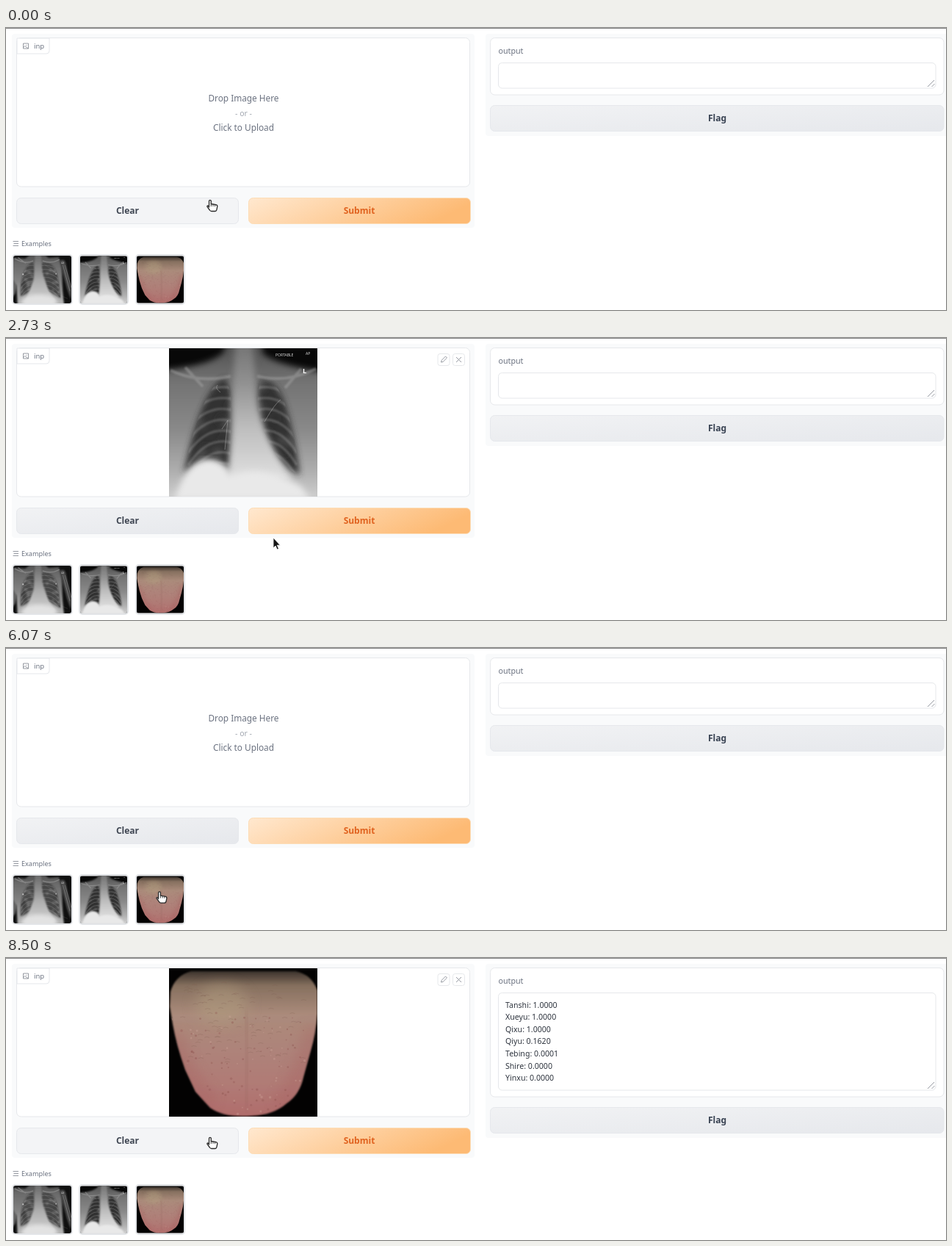
An HTML page for the animation above (8530 ms loop, 1280 px wide and 384 px high).

```html
<!DOCTYPE html>
<html lang="en">
<head>
<meta charset="utf-8">
<title>Image classifier demo</title>
<style>
html, body { margin: 0; width: 100%; height: 100%; overflow: hidden; background: #fff; }
svg { display: block; }
text { font-family: "Noto Sans", "Open Sans", sans-serif; }
.btn { font-size: 12px; font-weight: 600; text-anchor: middle; }
.drop { font-size: 11.8px; text-anchor: middle; fill: #6b7280; }
.card { fill: #fff; stroke: #e6e8eb; }
.line { fill: none; stroke: #8b8f98; stroke-width: .9; }
</style>
</head>
<body>
<svg id="stage" width="1280" height="384" viewBox="0 0 1280 384"></svg>
<script>
const LOOP = 8530, SPEED = 3, ROW = 16.65;

let seed = 11;
const rnd = () => (seed = (seed * 16807) % 2147483647) / 2147483647;
const span = (a, b) => (a + rnd() * (b - a)).toFixed(1);
const many = (n, f) => Array.from({ length: n }, (_, i) => f(i)).join('');
const rect = (x, y, w, h, r, extra = '') =>
  `<rect x="${x}" y="${y}" width="${w}" height="${h}" rx="${r}" ${extra}/>`;
const label = (x, y, s, extra = '') => `<text x="${x}" y="${y}" ${extra}>${s}</text>`;
const grad = (id, stops, dir = 'x2="0" y2="1"') =>
  `<linearGradient id="${id}" ${dir}>` +
  stops.map(([o, c]) => `<stop offset="${o}" stop-color="${c}"/>`).join('') + '</linearGradient>';
const ribs = (x, y, dir, n, gap, w) => many(n, i =>
  `<path d="M${x} ${y + i * gap}q${dir * w * .55} ${-6 - i} ${dir * w} ${20 + i * 2}"/>`);
const blobs = (n, x0, x1, y0, y1, r0, r1, colors, alpha) => many(n, i =>
  `<circle cx="${span(x0, x1)}" cy="${span(y0, y1)}" r="${span(r0, r1)}" fill="${colors[i % colors.length]}" opacity="${alpha}"/>`);

const lungsA = 'M84 28C60 32 40 70 33 115Q29 145 31 172Q54 166 70 146Q84 112 90 62ZM120 32Q160 20 178 58Q194 95 200 180Q176 166 150 150Q126 112 117 62Z';
const lungsB = 'M76 40C54 48 34 100 20 171Q48 140 82 164Q86 100 84 60ZM124 44Q146 40 158 76Q172 120 178 172Q152 164 133 122Q116 80 122 56Z';
const tongue = 'M2 32Q8 10 30 4H172Q194 8 202 30V62Q200 88 193 112L183 148Q178 172 160 184Q142 200 112 201Q76 204 56 190L36 168 22 138Q10 104 5 76L1 52Z';

const defs = `<defs>
  <filter id="soft" x="-10%" y="-10%" width="120%" height="120%"><feGaussianBlur stdDeviation="4"/></filter>
  <filter id="haze" x="-30%" y="-30%" width="160%" height="160%"><feGaussianBlur stdDeviation="9"/></filter>
  <filter id="fine"><feGaussianBlur stdDeviation="1"/></filter>
  ${grad('gray', [[0, '#f1f2f4'], [1, '#e6e8ec']], 'x2="1" y2="1"')}
  ${grad('orange', [[0, '#ffe8cf'], [1, '#fdba74']], 'x2="1" y2=".25"')}
  ${grad('orangeHover', [[0, '#ffe6cb'], [1, '#fed8ac']], 'x2="1" y2=".25"')}
  ${grad('bodyA', [[0, '#484848'], [.2, '#6a6a6a'], [.5, '#808080'], [.8, '#a4a4a4'], [1, '#bdbdbd']])}
  ${grad('bodyB', [[0, '#4c4c4c'], [.25, '#737373'], [.55, '#8a8a8a'], [.8, '#aeaeae'], [1, '#d6d6d6']])}
  ${grad('heartA', [[0, '#6a6a6a'], [.3, '#8c8c8c'], [.6, '#b4b4b4'], [1, '#d4d4d4']])}
  ${grad('heartB', [[0, '#757575'], [.3, '#959595'], [.6, '#c2c2c2'], [1, '#e6e6e6']])}
  ${grad('skin', [[0, '#3c332c'], [.1, '#86705f'], [.3, '#ab8b7b'], [.55, '#ae837a'], [.8, '#b07a75'], [1, '#b06c6b']])}
  <clipPath id="clipA"><path d="${lungsA}"/></clipPath>
  <clipPath id="clipB"><path d="${lungsB}"/></clipPath>
  <clipPath id="clipC"><path d="${tongue}"/></clipPath>

  <symbol id="imgA" viewBox="0 0 246 202">
    <rect width="246" height="202" fill="#101010"/>
    <path d="M-12 8L50 12 82-12H124L150 10 192 6Q208 40 207 80Q206 140 216 215H18Q16 160 12 125L-12 118Z" fill="url(#bodyA)" filter="url(#soft)"/>
    <path d="M-6 100Q12 110 14 130L8 160-6 180Z" fill="#686868" filter="url(#soft)"/>
    <path d="M196 24Q212 8 222 30L246 142V186Q232 160 220 110Z" fill="#4c4c4c" filter="url(#soft)"/>
    <path d="M210 40L240 150M219 40L246 136" stroke="#858585" stroke-width="2" filter="url(#fine)"/>
    <path d="${lungsA}" fill="#464646" filter="url(#soft)"/>
    <g clip-path="url(#clipA)">
      <g filter="url(#soft)">${blobs(90, 30, 202, 60, 170, 4, 8, ['#8c8c8c', '#7a7a7a', '#383838'], .5)}</g>
      <g stroke="#aaa" stroke-width="4" fill="none" opacity=".24" filter="url(#fine)">
        ${ribs(92, 42, -1, 8, 17, 60)}${ribs(117, 42, 1, 8, 17, 76)}
      </g>
    </g>
    <path d="M92-9H117L122 62Q132 105 150 150L180 190H50Q74 145 88 100Z" fill="url(#heartA)" opacity=".9" filter="url(#soft)"/>
    <ellipse cx="110" cy="196" rx="76" ry="30" fill="#e2e2e2" filter="url(#haze)"/>
    <path d="M5 12Q50 38 84 22M124 22Q160 36 196 16M20 8L52 32" fill="none" stroke="#a8a8a8" stroke-width="4" opacity=".5" filter="url(#fine)"/>
    <path d="M40 80Q60 92 78 82M135 40Q170 60 181 78M150 146Q190 165 230 182" fill="none" stroke="#ccc" stroke-width="1" opacity=".4"/>
    <circle cx="41" cy="79" r="3.6" fill="#bbb"/><circle cx="181" cy="77" r="3" fill="#aaa"/>
    ${label(203, 33, 'LI', 'font-size="11" font-weight="600" fill="#ddd" transform="rotate(12 203 33)"')}
  </symbol>

  <symbol id="imgB" viewBox="0 0 202 202">
    <rect width="202" height="202" fill="#080808"/>
    <path d="M-9 30Q55 24 74 6L78-9H126L128 8Q150 24 210 32V211H-9Z" fill="url(#bodyB)" filter="url(#soft)"/>
    <path d="${lungsB}" fill="#303030" filter="url(#soft)"/>
    <g clip-path="url(#clipB)">
      <g filter="url(#soft)">${blobs(50, 30, 175, 50, 165, 4, 7, ['#777', '#2c2c2c'], .4)}</g>
      <g stroke="#bbb" stroke-width="3.5" fill="none" opacity=".27" filter="url(#fine)">
        ${ribs(86, 54, -1, 8, 15, 60)}${ribs(120, 54, 1, 8, 15, 54)}
      </g>
    </g>
    <path d="M90-9H114L119 70Q128 126 168 180L80 184Q88 120 86 75Z" fill="url(#heartB)" opacity=".92" filter="url(#soft)"/>
    <path d="M8 206Q20 160 48 152Q72 148 84 174Q125 156 180 188L192 206Z" fill="#e9e9e9" filter="url(#soft)"/>
    <path d="M2 30Q40 48 84 38M120 38Q160 48 200 28M22 26L46 52M180 28L158 54" fill="none" stroke="#a8a8a8" stroke-width="4" opacity=".45" filter="url(#fine)"/>
    <path d="M70 60Q62 54 66 50M72 110L80 98 76 138M130 100Q145 74 152 70" fill="none" stroke="#ccc" opacity=".4"/>
    ${label(145, 10.5, 'PORTABLE', 'font-size="5" fill="#ddd"')}
    ${label(186, 8.5, 'AP', 'font-size="5" fill="#ddd"')}
    ${label(182, 34, 'L', 'font-size="9" font-weight="700" fill="#fff"')}
  </symbol>

  <symbol id="imgC" viewBox="0 0 202 202">
    <rect width="202" height="202" fill="#030202"/>
    <path d="${tongue}" fill="url(#skin)" filter="url(#fine)"/>
    <g clip-path="url(#clipC)">
      <ellipse cx="72" cy="50" rx="36" ry="28" fill="#b09d80" opacity=".5" filter="url(#haze)"/>
      <path d="M8 90Q20 150 58 184M196 80Q186 150 150 188" fill="none" stroke="#a5595a" stroke-width="22" opacity=".3" filter="url(#haze)"/>
      <path d="M104 60Q110 110 106 190" fill="none" stroke="#8f605a" stroke-width="7" opacity=".22" filter="url(#soft)"/>
      ${blobs(140, 0, 202, 60, 200, .6, 1.8, ['#874b49', '#905550', '#cda69b'], .35)}
      ${many(90, () => `<path d="M${span(15, 180)} ${span(18, 130)}q3-2 7 0" fill="none" stroke="#79584e" stroke-width=".8" opacity=".3"/>`)}
    </g>
  </symbol>
</defs>`;

const thumb = (x, w, id) =>
  rect(x - 1, 309, w + 2, 67, 4, 'fill="#fff" stroke="#e2e4e7" stroke-width="2"') +
  `<svg x="${x}" y="310" width="${w}" height="65"><clipPath id="t${id}">${rect(0, 0, w, 65, 3)}</clipPath>
   <g clip-path="url(#t${id})"><use href="#${id}" width="${w}" height="65"/></g></svg>`;

const stage = document.getElementById('stage');
stage.innerHTML = `${defs}
<rect width="1280" height="384" fill="#fff"/>
<rect width="1280" height="1" fill="#858585"/>
${rect(8, 8, 630, 264, 4, 'fill="#f9fafb"')}
${rect(14.5, 13.5, 617, 202.5, 6, 'class="card"')}
<g id="empty">
  ${label(323.5, 99.5, 'Drop Image Here', 'class="drop"')}
  ${label(323.5, 119.5, '- or -', 'class="drop" style="font-size:10.5px;fill:#a3a8b1"')}
  ${label(323.5, 140, 'Click to Upload', 'class="drop"')}
</g>
<g id="loaded">
  <use id="photo" y="14" height="202"/>
  ${rect(588, 21.5, 16, 16, 3, 'class="card"')}${rect(608.5, 21.5, 16, 16, 3, 'class="card"')}
  <path class="line" d="M592.5 33l.6-2.6 5.4-5.4 2 2-5.4 5.4ZM613 26l7 7M620 26l-7 7"/>
</g>
<path d="M15 14H59V31Q59 35 55 35H15Z" fill="#fff" stroke="#e5e7eb"/>
<path class="line" d="M23.5 21h7v7h-7ZM23.5 26.5l2.3-2 4.5 3.5M28 23v1"/>
${label(38, 27.8, 'inp', 'font-size="9.5" fill="#6b7280"')}
<rect id="clear" x="14.5" y="231.5" width="302" height="35" rx="6" stroke="#e6e8ec"/>
<rect id="submit" x="330.5" y="231.5" width="302" height="35" rx="6" stroke="#fddcb5"/>
${label(165.5, 253.2, 'Clear', 'class="btn" fill="#3f4652"')}
${label(481, 253.2, 'Submit', 'class="btn" fill="#e0621f"')}
<g id="examples">
  <path class="line" d="M9.5 290.5H17M10.5 293.5H17M9.5 296.5H17"/>
  ${label(21, 297, 'Examples', 'font-size="9.1" fill="#6b7280"')}
  ${thumb(10, 79, 'imgA')}${thumb(101, 64, 'imgB')}${thumb(178, 64, 'imgC')}
</g>
<rect id="panel" x="653" y="8" width="630" rx="4" fill="#f9fafb"/>
<rect id="card" class="card" x="659.5" y="13.5" width="617.5" rx="6"/>
<g id="output">
  ${label(670.5, 34.8, 'output', 'font-size="10.7" fill="#6b7280"')}
  <rect id="area" class="card" x="670.5" y="47.5" width="595.5" rx="5"/>
  <path id="grip" class="line" d="M1255 80l9-9M1260.5 80l4-4"/>
  <g id="rows" font-size="10.6" fill="#2f353f"></g>
</g>
<g id="busy">
  <circle cx="967" cy="51" r="6" fill="#ee8a3a"/>
  <text id="timer" x="1269.5" y="28.5" text-anchor="end" fill="#4b5563" style="font:10px 'Liberation Mono',monospace"></text>
</g>
<g id="flag">
  ${rect(659.5, 105.5, 617.5, 35, 6, 'fill="url(#gray)" stroke="#e6e8ec"')}
  ${label(968.5, 127, 'Flag', 'class="btn" fill="#374151"')}
</g>
<g id="cursor">
  <g id="hand" stroke="#2a2a2a" stroke-width="1.3" stroke-linejoin="round">
    <path fill="#fff" d="M-4.5 2V-6.3a1.4 1.4 0 0 1 2.8 0V-2.5L5-1.3Q7-.8 6.8 1.2L6 5Q5.7 7.5 3.5 7.5H-1.2Q-2.7 7.5-3.6 6L-7 1.4Q-7.4.2-6.3 0Q-5.4 0-4.5 2Z"/>
    <path fill="none" stroke-width=".9" d="M-1.7-2.5V1M1-2V1M3.6-1.5V1.2"/>
  </g>
  <path id="arrow" d="M-4-8V6L-1 3 1.2 8 3.4 7 1.2 2.2H5.4Z" fill="#151515" stroke="#fff" stroke-width=".8"/>
</g>`;

const el = {};
stage.querySelectorAll('[id]').forEach(n => el[n.id] = n);
const set = (id, name, v) => {
  if (el[id].getAttribute(name) !== String(v)) el[id].setAttribute(name, v);
};
const show = (id, on) => set(id, 'visibility', on ? 'visible' : 'hidden');

// [begin, end, ...]
const photos = [[230, 1950, 'imgA', 200, 246], [2480, 5850, 'imgB', 222, 202], [6180, LOOP, 'imgC', 222, 202]];
const waits = [[400, 1390], [3200, 4200], [6465, 7570]];
const results = [
  [1390, 1950, 'Infiltration 0.7412,Effusion 0.6548,Consolidation 0.6127,Edema 0.5836,Pneumonia 0.5409,Atelectasis 0.5273,Mass 0.4718,Nodule 0.4506,Cardiomegaly 0.4127,Pneumothorax 0.3864,Emphysema 0.3391,Pleural_Thickening 0.3208,Fibrosis 0.2415,Hernia 0.1036'],
  [4200, 5850, 'Emphysema 0.8375,Infiltration 0.6231,Pneumothorax 0.6203,Atelectasis 0.5340,Effusion 0.4913,Consolidation 0.4655,Nodule 0.4224,Edema 0.4219,Mass 0.3505,Pneumonia 0.3252,Pleural_Thickening 0.3052,Cardiomegaly 0.2980,Hernia 0.1914,Fibrosis 0.1769'],
  [7570, LOOP, 'Tanshi 1.0000,Xueyu 1.0000,Qixu 1.0000,Qiyu 0.1620,Tebing 0.0001,Shire 0.0000,Yinxu 0.0000']
].map(([a, b, s]) => [a, b, s.split(',').map(r => r.replace(' ', ': '))]);

// Pointer stops: time, x, y
const stops = [
  [0, 281, 242], [40, 281, 242], [200, 55, 343], [250, 55, 343], [385, 374, 261],
  [1680, 374, 261], [1900, 262, 258], [2000, 262, 258], [2300, 133, 345], [2480, 133, 345],
  [2730, 368, 280], [2760, 368, 280], [2980, 402, 263], [4700, 402, 263], [5150, 262, 258],
  [5860, 262, 258], [6100, 210, 343], [6190, 210, 343], [6420, 396, 252], [8100, 396, 252],
  [8480, 281, 252], [LOOP, 281, 252]
];

const active = (list, t) => list.find(([a, b]) => t >= a && t < b);
const inside = (x, y, l, top, r, b) => x >= l && x <= r && y >= top && y <= b;

function pointer(t) {
  const i = stops.findIndex(s => s[0] > t), [t0, x0, y0] = stops[i - 1], [t1, x1, y1] = stops[i];
  const u = (t - t0) / (t1 - t0), k = u * u * (3 - 2 * u);
  return [x0 + (x1 - x0) * k, y0 + (y1 - y0) * k];
}

let shown = null;
function showRows(rows) {
  if (rows === shown) return;
  shown = rows;
  el.rows.innerHTML = rows ? rows.map((r, i) => label(680, 67.5 + i * ROW, r)).join('') : '';
}

function draw(t) {
  const photo = active(photos, t), wait = active(waits, t), result = active(results, t);
  show('empty', !photo);
  show('loaded', photo);
  if (photo) {
    set('photo', 'href', '#' + photo[2]);
    set('photo', 'x', photo[3]);
    set('photo', 'width', photo[4]);
  }

  const rows = result ? result[2] : null;
  const grow = rows ? Math.round(rows.length * ROW + 16) - 35 : 0;
  showRows(rows);
  set('panel', 'height', 139 + grow);
  set('card', 'height', 77.5 + grow);
  set('area', 'height', 34.5 + grow);
  set('grip', 'transform', `translate(0 ${grow})`);
  set('flag', 'transform', `translate(0 ${grow})`);
  set('examples', 'transform', `translate(0 ${Math.max(0, grow - 126)})`);

  show('output', !wait);
  show('busy', wait);
  if (wait) el.timer.textContent = ((t - wait[0]) * SPEED / 1000 + 1e-6).toFixed(1) + 's';

  const [x, y] = pointer(t), tx = x - 3, ty = y - 8;
  const onClear = inside(tx, ty, 14, 231, 317, 267);
  const onSubmit = inside(tx, ty, 330, 231, 633, 267);
  const onThumb = !grow && inside(tx, ty, 10, 310, 242, 375);
  const hand = onClear || onSubmit || onThumb;
  set('clear', 'fill', onClear ? '#f3f4f6' : 'url(#gray)');
  set('submit', 'fill', onSubmit ? 'url(#orangeHover)' : 'url(#orange)');
  show('hand', hand);
  show('arrow', !hand);
  set('cursor', 'transform', `translate(${x.toFixed(2)} ${y.toFixed(2)})`);
}

function tick() {
  draw(performance.now() % LOOP);
  requestAnimationFrame(tick);
}
tick();
</script>
</body>
</html>
```
